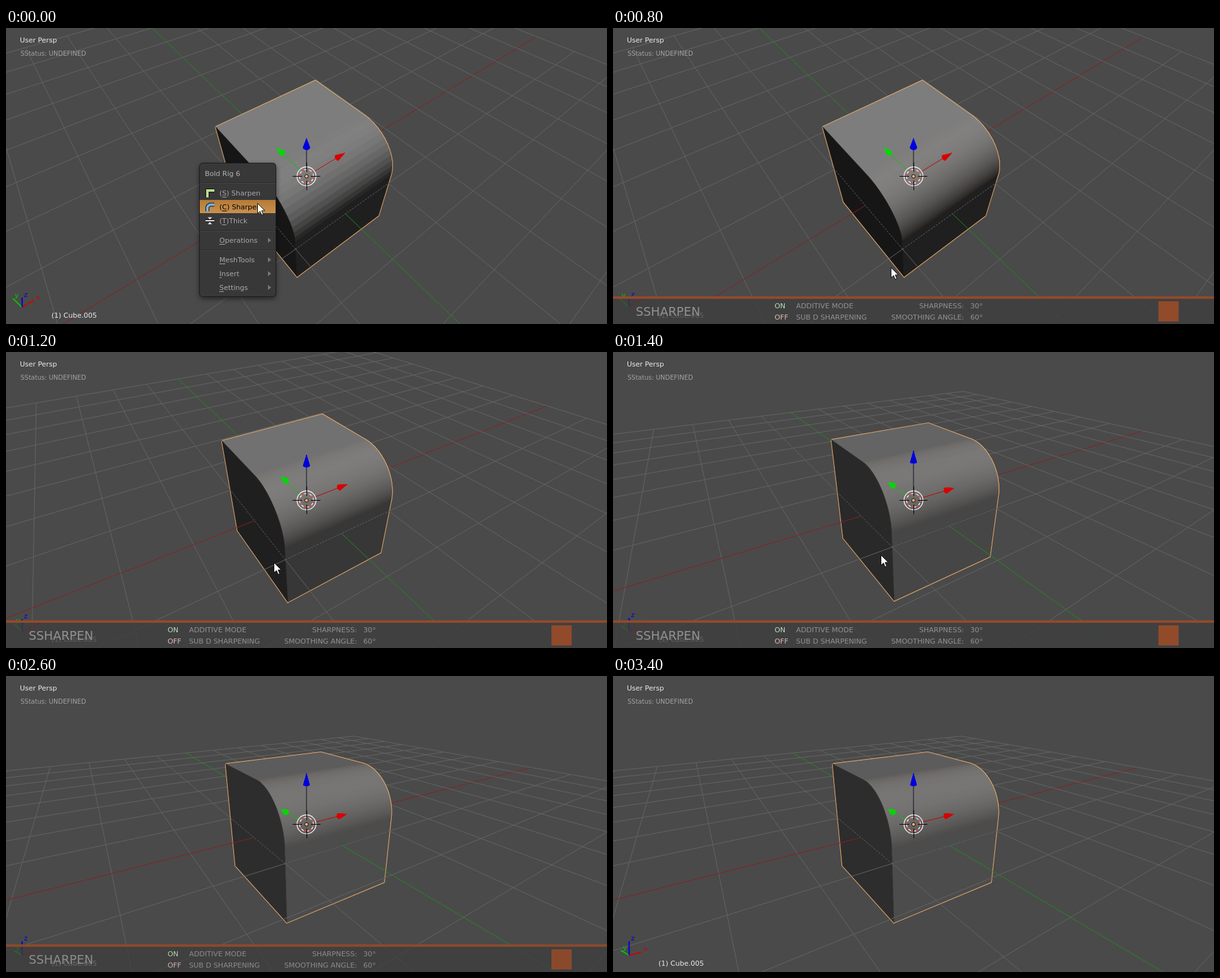
An HTML page with a canvas that plays this animation: 952 by 470 pixels, repeating every 3800 ms.

```html
<!DOCTYPE html>
<html>
<head>
<meta charset="utf-8">
<style>
html, body { margin: 0; width: 100%; height: 100%; overflow: hidden; background: #4a4a4a; }
canvas { display: block; }
</style>
</head>
<body>
<canvas id="stage" width="952" height="470"></canvas>
<script>
const ctx = document.getElementById('stage').getContext('2d');
const LOOP = 3800, CX = 476, CY = 235.5, FOCAL = 520.6, DIST = 5.75, GRID = 8;
const BEVEL = 0.76, GREY = '#646464', RED = '#8c1f1f', GREEN = '#1f8c1f', RUST = '#914a2a';

// Each row starts at a time in ms
const POSES = [[0, 50, 38.47], [1000, 44, 35.6], [1200, 37.6, 32.8], [1400, 27.8, 33], [1600, 22.8, 33.15]];
const POINTER = [[0, 398, 278], [200, 369, 256], [400, 366, 253], [600, 378, 273], [800, 440, 380],
  [1000, 432, 357], [1200, 424, 334], [1400, 424, 322], [1600, 425, 313], [1800, 355, 359], [2000]];
const BAR = [[0, 0], [600, 1], [2600, 0.92], [2800, 0.65], [3000, 0.3], [3200, 0.04], [3400, 0]];
const MENU = [[262, '(S) Sharpen', 1], [284, '(C) Sharpen', 1], [306, '(T)Thick', 1],
  [337, 'Operations', 0], [368, 'MeshTools', 0], [390, 'Insert', 0], [412, 'Settings', 0]];

const at = (rows, t) => rows.filter(row => row[0] <= t).pop();

let right, up, ahead;
function setCamera(elevation, turn) {
  const e = elevation * Math.PI / 180, a = turn * Math.PI / 180;
  const S = Math.sin(a), C = Math.cos(a);
  right = [C, -S, 0];
  up = [S * Math.sin(e), C * Math.sin(e), Math.cos(e)];
  ahead = [S * Math.cos(e), C * Math.cos(e), -Math.sin(e)];
}
const dot = (a, b) => a[0] * b[0] + a[1] * b[1] + a[2] * b[2];
const depth = p => DIST + dot(ahead, p);
function project(p) {
  const k = FOCAL / depth(p);
  return [CX + k * dot(right, p), CY - k * dot(up, p)];
}
function shade(n) {
  const v = Math.round(6 + 43.3 * dot(up, n) - 119 * dot(ahead, n) - 14 * Math.abs(dot(right, n)));
  return `rgb(${v},${v},${v})`;
}

function trace(points, close) {
  ctx.beginPath();
  points.forEach(p => ctx.lineTo(p[0], p[1]));
  if (close) ctx.closePath();
}
function poly(points, fill) {
  trace(points, true);
  ctx.fillStyle = fill;
  ctx.fill();
}
function stroke(points, color, width = 1, dash = []) {
  trace(points);
  ctx.strokeStyle = color;
  ctx.lineWidth = width;
  ctx.setLineDash(dash);
  ctx.stroke();
  ctx.setLineDash([]);
}
function ring(x, y, r, color, width = 1, dash = []) {
  ctx.beginPath();
  ctx.arc(x, y, r, 0, 7);
  ctx.strokeStyle = color;
  ctx.lineWidth = width;
  ctx.setLineDash(dash);
  ctx.stroke();
  ctx.setLineDash([]);
}
function text(s, x, y, color, size = 11, align = 'left') {
  ctx.font = `${size}px "DejaVu Sans", sans-serif`;
  ctx.textAlign = align;
  ctx.fillStyle = color;
  ctx.fillText(s, x, y);
}

// 3D line, cut at the near plane
function line(a, b, color, dash) {
  const near = 0.3;
  const cut = (p, q) => {
    const k = (near - depth(p)) / (depth(q) - depth(p));
    return p.map((v, i) => v + (q[i] - v) * k);
  };
  if (depth(a) < near && depth(b) < near) return;
  if (depth(a) < near) a = cut(a, b);
  else if (depth(b) < near) b = cut(b, a);
  stroke([project(a), project(b)], color, 1, dash);
}
function gridLines(front) {
  for (let c = -GRID; c <= GRID; c++) {
    for (const alongY of [true, false]) {
      const color = c ? GREY : alongY ? GREEN : RED;
      const seg = (from, to, dash) => alongY
        ? line([c, from, 0], [c, to, 0], color, dash)
        : line([from, c, 0], [to, c, 0], color, dash);
      if (c > -1) front ? seg(-GRID, -1) : seg(-1, GRID);
      else if (front && c < -1) seg(-GRID, GRID);
      else if (front) {
        seg(-GRID, -1);
        seg(-1, 1, [3, 2]);
        seg(1, GRID);
      }
    }
  }
}

function block(smooth) {
  const n = smooth ? 48 : 12, mid = 1 - BEVEL, profile = [[1, 1]], faces = [];
  for (let i = 0; i <= n; i++) {
    const a = i / n * Math.PI / 2;
    profile.push([-mid - BEVEL * Math.sin(a), mid + BEVEL * Math.cos(a)]);
  }
  profile.push([-1, -1]);
  for (let i = 0; i < profile.length - 1; i++) {
    const [y, z] = profile[i], [y2, z2] = profile[i + 1];
    const len = Math.hypot(y2 - y, z2 - z);
    faces.push([[[-1, y, z], [1, y, z], [1, y2, z2], [-1, y2, z2]], [0, (z2 - z) / len, (y - y2) / len]]);
  }
  faces.push([[...profile.map(([y, z]) => [-1, y, z]), [-1, 1, -1]], [-1, 0, 0]]);
  const flat = faces.map(([pts, normal]) => [pts.map(project), shade(normal)]);
  ctx.lineJoin = 'round';
  for (const [pts] of flat) stroke([...pts, pts[0]], '#f3b06c', 2.5);
  for (const [pts, color] of flat) {
    poly(pts, color);
    stroke([...pts, pts[0]], color, 0.6);
  }
  ctx.lineJoin = 'miter';
}

function arrow(axis, color, stem) {
  const point = (len, u = 0, v = 0) => {
    const p = [0, 0, 0];
    p[axis] = len;
    p[(axis + 1) % 3] = u;
    p[(axis + 2) % 3] = v;
    return project(p);
  };
  stroke([point(0.18), point(0.72)], stem);
  const tip = point(0.91), base = [];
  for (let i = 0; i < 16; i++) {
    const a = i * Math.PI / 8;
    base.push(point(0.71, 0.056 * Math.cos(a), 0.056 * Math.sin(a)));
  }
  poly(base, color);
  base.forEach((p, i) => poly([tip, p, base[(i + 5) % 16]], color));
}

function handles() {
  arrow(1, '#00d800', '#00c800');
  arrow(0, '#d80000', '#c80000');
  arrow(2, '#0000dc', '#0c0c24');
  ring(CX, CY, 15, '#f4f4f4', 1.3);
  ring(CX, CY, 11, '#f0f0f0', 1.2);
  ring(CX, CY, 11, '#e02020', 1.2, [4.3, 4.3]);
  for (const s of [-1, 1]) {
    stroke([[CX + 7 * s, CY], [CX + 22 * s, CY]], '#000');
    stroke([[CX + 0.5, CY + 7 * s], [CX + 0.5, CY + 22 * s]], '#000');
  }
  ctx.beginPath();
  ctx.arc(CX, CY, 2.6, 0, 7);
  ctx.fillStyle = '#e8b078';
  ctx.fill();
  ring(CX, CY, 2.8, '#201008');
}

function cornerAxes() {
  ['#d40000', '#00c800', '#0000d4'].forEach((color, i) => {
    const x = 25.5 + 24 * right[i], y = 443.5 - 24 * up[i];
    stroke([[25.5, 443.5], [x, y]], color, 2);
    text('xyz'[i], x + 3, y - 1, color);
  });
}

function menuIcon(i, y) {
  const colors = ['#b9dd8f', '#6fb4e8', '#e8e8e8'];
  ctx.save();
  ctx.translate(315, y - 8);
  if (i < 2) {
    for (const [color, width] of [['#0c0c0c', 6], [colors[i], 4]]) {
      const pts = i ? [[4, 15], [4, 9], [5, 6.5], [8, 4.5], [15, 4.5]] : [[4, 15], [4, 4], [15, 4]];
      stroke(pts, color, width);
    }
  } else {
    stroke([[1, 8], [15, 8]], '#0c0c0c', 4);
    stroke([[1, 8], [15, 8]], colors[2], 2);
    poly([[8, 6], [4.5, 2.5], [11.5, 2.5]], colors[2]);
    poly([[8, 10], [4.5, 13.5], [11.5, 13.5]], colors[2]);
  }
  ctx.restore();
}

function menu(active) {
  ctx.save();
  ctx.shadowColor = 'rgba(0,0,0,.55)';
  ctx.shadowBlur = 9;
  ctx.shadowOffsetY = 3;
  ctx.beginPath();
  ctx.roundRect(306.5, 214.5, 121, 212, 5);
  ctx.fillStyle = '#383838';
  ctx.fill();
  ctx.restore();
  ctx.strokeStyle = '#1c1c1c';
  ctx.lineWidth = 1;
  ctx.stroke();
  text('Bold Rig 6', 315, 235, '#b4b4b4');
  for (const y of [245.5, 321.5, 352.5]) {
    stroke([[307, y], [427, y]], '#2a2a2a');
    stroke([[307, y + 1], [427, y + 1]], '#464646');
  }
  MENU.forEach(([y, label, key], i) => {
    if (i === active) {
      const g = ctx.createLinearGradient(0, y - 11, 0, y + 11);
      g.addColorStop(0, '#b57a38');
      g.addColorStop(1, '#c99250');
      ctx.fillStyle = g;
      ctx.fillRect(307, y - 11, 120, 21);
    }
    const color = i === active ? '#000' : '#a9a9a9';
    text(label, 338, y + 4, color);
    const x = 338 + ctx.measureText(label.slice(0, key)).width;
    ctx.fillRect(x, y + 6, ctx.measureText(label[key]).width, 1);
    if (i < 3) menuIcon(i, y);
    else poly([[415, y - 4], [420, y], [415, y + 4]], '#787878');
  });
}

function bar(alpha) {
  ctx.globalAlpha = alpha * 0.8;
  ctx.fillStyle = '#3e3e3e';
  ctx.fillRect(0, 427, 952, 43);
  ctx.globalAlpha = alpha;
  ctx.fillStyle = RUST;
  ctx.fillRect(0, 426, 952, 4);
  ctx.fillRect(864, 434, 32, 32);
  const grey = '#919191';
  text('SSHARPEN', 36, 457, grey, 19);
  [['ON', '#b9dcb4', 'ADDITIVE MODE', 'SHARPNESS:', '30°'],
   ['OFF', '#dcb9b4', 'SUB D SHARPENING', 'SMOOTHING ANGLE:', '60°']].forEach(([state, color, name, key, value], i) => {
    const y = 445 + 18 * i;
    text(state, 256, y, color, 11.2);
    text(name, 290, y, grey, 11.2);
    text(key, 556, y, grey, 11.2, 'right');
    text(value, 566, y, grey, 11.2);
  });
  ctx.globalAlpha = 1;
}

function pointer(x, y) {
  const shape = [[0, 0], [0, 16], [4, 12.5], [6.5, 18.5], [9, 17.5], [6.5, 11.5], [11.5, 11.5]]
    .map(p => [p[0] + x + 0.5, p[1] + y + 0.5]);
  poly(shape, '#fff');
  stroke([...shape, shape[0]], '#111');
}

function draw(now) {
  const t = now % LOOP;
  const [, elevation, turn] = at(POSES, t), [, px, py] = at(POINTER, t), alpha = at(BAR, t)[1];
  setCamera(elevation, turn);
  ctx.fillStyle = '#4a4a4a';
  ctx.fillRect(0, 0, 952, 470);
  gridLines(false);
  block(t >= 600);
  gridLines(true);
  handles();
  cornerAxes();
  text('User Persp', 22, 23, '#ececec');
  text('SStatus: UNDEFINED', 23, 44, '#a2a2a2', 10);
  text('(1) Cube.005', 72, 460, '#ececec');
  if (alpha) bar(alpha);
  if (t < 600) menu(t < 200 ? 1 : 0);
  if (px) pointer(px, py);
}

const start = performance.now();
function tick() {
  draw(performance.now() - start);
  requestAnimationFrame(tick);
}
tick();
</script>
</body>
</html>
```
